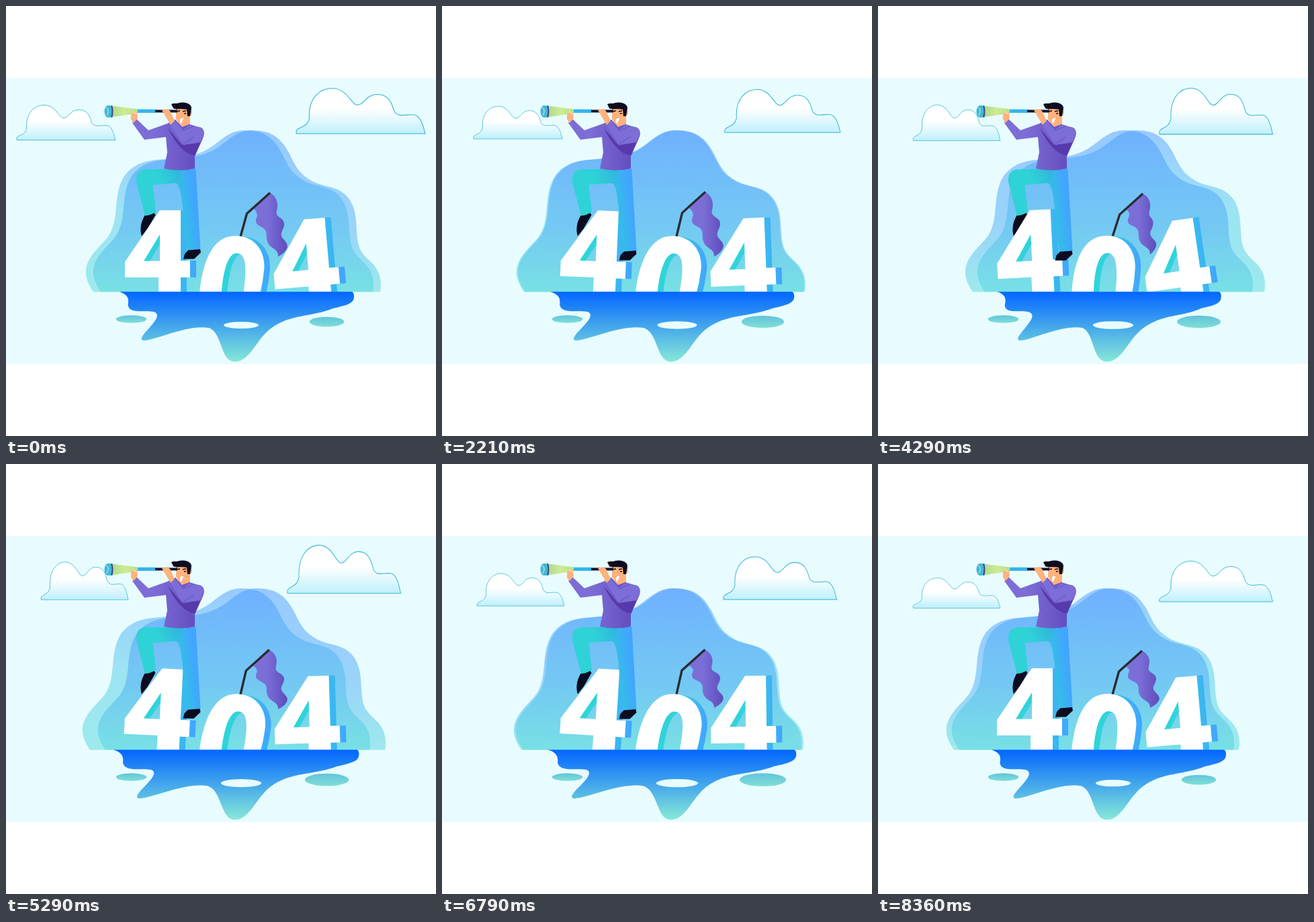
Recreate the animation shown at these times as an HTML page. Size 640x640 px, loop 8.43 s.

```html
<!DOCTYPE html>
<html lang="en">
<head>
<meta charset="utf-8">
<title>404</title>
<style>
  html, body { margin: 0; width: 100%; height: 100%; overflow: hidden; background: #fff; }
  svg { display: block; width: 100vw; height: 100vh; }
  .cloud { fill: url(#cloudFill); stroke: #35b6d6; stroke-width: 1.1; vector-effect: non-scaling-stroke; }
  .skin { fill: #ffb27c; }
  .dark { fill: #0c0c20; }
</style>
</head>
<body>
<svg viewBox="0 0 640 640">
  <defs>
    <linearGradient id="cloudFill" x2="0" y2="1">
      <stop offset=".45" stop-color="#fff"/><stop offset="1" stop-color="#bff0fc"/>
    </linearGradient>
    <linearGradient id="blueHill" x2="0" y2="1">
      <stop stop-color="#4797ff"/><stop offset=".6" stop-color="#4bacf3"/><stop offset="1" stop-color="#52d7db"/>
    </linearGradient>
    <linearGradient id="cyanHill" x2="0" y2="1">
      <stop stop-color="#4797ff"/><stop offset=".5" stop-color="#51cbe8"/><stop offset="1" stop-color="#52d7db"/>
    </linearGradient>
    <linearGradient id="waterFill" gradientUnits="userSpaceOnUse" x1="0" y1="427" x2="0" y2="530">
      <stop stop-color="#0468ff"/><stop offset="1" stop-color="#88e9d7"/>
    </linearGradient>
    <linearGradient id="poolFill" x2="0" y2="1">
      <stop stop-color="#62c3dc"/><stop offset="1" stop-color="#7fdfd6"/>
    </linearGradient>
    <linearGradient id="sideFill">
      <stop offset=".5" stop-color="#2fd4da"/><stop offset="1" stop-color="#42a4ff"/>
    </linearGradient>
    <linearGradient id="legFill" gradientUnits="userSpaceOnUse" x1="246" y1="270" x2="288" y2="264">
      <stop offset=".1" stop-color="#2fc6de"/><stop offset=".75" stop-color="#42a5ff"/>
    </linearGradient>
    <linearGradient id="thighFill" gradientUnits="userSpaceOnUse" x1="200" y1="270" x2="262" y2="245">
      <stop offset=".45" stop-color="#2fd2d6"/><stop offset="1" stop-color="#30b4de"/>
    </linearGradient>
    <linearGradient id="shirtFill">
      <stop offset=".3" stop-color="#7d6dd6"/><stop offset="1" stop-color="#5f47bb"/>
    </linearGradient>
    <linearGradient id="flagFill">
      <stop offset=".4" stop-color="#7b6fd7"/><stop offset="1" stop-color="#5e4cbc"/>
    </linearGradient>
    <linearGradient id="tubeFill">
      <stop stop-color="#a8dc8c"/><stop offset=".5" stop-color="#d0ea94"/><stop offset="1" stop-color="#b5e08e"/>
    </linearGradient>
    <clipPath id="shore"><path d="M0 0H640V425.500H0z"/></clipPath>
    <path id="cloud" d="M.5 68V64C3 57 17 60 20 45C18 14 36 0 54 0C77 0 82 24 91 25C101 26 105 9 121 9C141 9 143 25 147 35C154 46 171 36 180 41C188 47 190 57 193 68z"/>
    <path id="hill" d="M11 425.500C2 413 -1 402 0 393C2 370 26 355 35 340C47 320 43 295 49 272C55 248 72 232 105 229C135 226 160 226 183 212C200 202 212 185 236 185C265 185 280 196 293 222C302 241 309 254 333 264C350 270 366 270 378 284C392 300 391 322 392 335C393 352 395 362 403 371C410 379 420 385 425 398C428 406 429 416 427 425.500z"/>
    <path id="four" fill-rule="evenodd" d="M229 304H260V379H274V404H260V450H227V404H177V381zM229 340V379.500H205z"/>
    <path id="zero" fill-rule="evenodd" d="M287 450C288 390 304 342 341 342C374 342 387 370 384 393Q382 417 375 440zM320 450C320 410 327 368 343 368C360 368 359 395 350 450z"/>
    <g id="solidFour"><use href="#four" x="9" fill="url(#sideFill)"/><use href="#four" fill="#fff"/></g>
  </defs>

  <path fill="#e8fcff" d="M0 107H640V533H0z"/>
  <use href="#cloud" id="cloudL" class="cloud"/>
  <use href="#cloud" id="cloudR" class="cloud"/>
  <use href="#hill" id="hillA" fill="url(#cyanHill)" opacity=".5"/>
  <use href="#hill" id="hillB" fill="url(#blueHill)" opacity=".5"/>

  <g clip-path="url(#shore)">
    <path id="flag" fill="url(#flagFill)"/>
    <path id="pole" fill="none" stroke="#2a2b33" stroke-width="3.400"/>
    <path class="dark" d="M207 311L220 307L222.500 311L211 331L202 342.500C199 334 200 322 207 311z"/>
    <use href="#solidFour" id="digitL"/>
    <g id="digitM"><use href="#zero" x="8.500" y="1" fill="url(#sideFill)"/><use href="#zero" fill="#fff"/></g>
    <g id="digitR"><use href="#solidFour" x="223.500" y="11"/></g>
  </g>

  <path id="water" fill="url(#waterFill)"/>
  <ellipse cx="186.500" cy="466" rx="22.700" ry="5.800" fill="url(#poolFill)"/>
  <ellipse id="poolM" cx="350" cy="475" fill="#e9fdff"/>
  <ellipse id="poolR" cx="477.500" cy="470" fill="url(#poolFill)"/>

  <path id="legR" fill="url(#legFill)"/>
  <path fill="url(#thighFill)" d="M262 243H212C197 242 192 251 194.500 264L207 312Q214 312 223 306.500L218.500 266L256 263.500z"/>
  <path id="shoeR" class="dark" d="M271 363.500L289 362L290 367L280 376.500H264L266 369z"/>

  <path class="skin" d="M253 153H274C278 155 278 162 274 163V179L266 184L258 177L253 168z"/>
  <path fill="url(#shirtFill)" d="M194 168L212 185L240 175L252 169L262 180L273 176L286 180C296 181 296 190 293 197L281 224V242Q260 247 235 242L240 218L238 195L206 199L188 174z"/>
  <path fill="#5639aa" d="M241 182L262 207L289 202L281 222C268 222 252 205 241 182z"/>
  <path fill="#7d6dd6" d="M245 178L251 171L263 185L273 177L286 180C296 181 297 190 289 203L263 207z"/>
  <path fill="none" stroke="#6450bd" d="M263 186L279 179M262 207L279 195"/>
  <path class="dark" d="M246 146C250 144 253 146 258 144C268 142 276 146 276 152L274 164H270L269 154C260 152 252 155 249 152z"/>
  <path fill="none" stroke="#0c0c20" stroke-width="1.600" d="M254 157L259 156M263 157L268 156M265 160H268"/>
  <path fill="#fff" d="M259 169Q263 165 264 168L261 175Q258 174 259 169z"/>

  <path fill="#15142e" d="M222 154.500H255V158.500H222z"/>
  <path fill="#36b3ee" d="M196 153.800H222V159H196z"/>
  <path fill="url(#tubeFill)" d="M157 148.500L196 153.500V159.500L157 165.500z"/>
  <path fill="#3fc4d4" d="M152 148L159 148.500V165.500L152 166z"/>
  <path fill="none" stroke="#4b3c86" stroke-width="2" d="M157 148.500Q160 157 157 165.500"/>
  <ellipse cx="151.500" cy="157" rx="5" ry="9" fill="#45b3dc"/>
  <path fill="none" stroke="#7ce0cf" stroke-width="2" d="M149 151Q155 155 150 163"/>
  <path class="skin" d="M186 161L191 157L195 159L196 167L190 174L186 169z"/>
  <path fill="none" stroke="#fff" d="M189 157L194 161"/>
  <path class="skin" d="M232 155L240 153L244 156L251 171L245 177L239 167z"/>
</svg>
<script>
const LOOP = 8430;
const $ = id => document.getElementById(id);
const set = (id, name, value) => $(id).setAttribute(name, value);

const linear = u => u;
const smooth = u => (1 - Math.cos(Math.PI * u)) / 2;

function key(t, times, values, ease = linear) {
  let i = 0;
  while (i < times.length - 2 && t > times[i + 1]) i++;
  const u = Math.max(0, Math.min(1, (t - times[i]) / (times[i + 1] - times[i])));
  return values[i] + (values[i + 1] - values[i]) * ease(u);
}

// Turning points shared by the rocking digits and the sliding hills
const TURNS = [0, 1210, 3210, 4290, 5290, 6790, 7900];
const SWAY = [0, 1, .57, -.9, .93, 1.17, 0];
const CYAN_X = [119, 89, 133, 148, 114, 110, 110];
const BLUE_X = [130, 122, 104, 130, 137, 107, 102];

// Clouds shrink while drifting in, puff up, then sink.
function drawClouds(t) {
  const drift = key(t, [0, 2600], [0, 1]);
  const float = (...v) => key(t, [0, 2600, 5570, 7250], v);
  const top = float(0, 2, -2, 22), bottom = float(0, -2, 3, 15);
  const place = (id, x, dx, y, width, shrink, height) => set(id, 'transform',
    `translate(${x + dx * drift} ${y + top})
     scale(${(width - shrink * drift) / 193} ${(height + bottom - top) / 68})`);
  place('cloudL', 15.5, 36.5, 147.5, 147.5, 17.5, 52);
  place('cloudR', 431.5, -13, 122.5, 192.5, 23.5, 67.5);
}

function drawFlag(t, sway) {
  const px = 393 - 1.3 * sway, py = 278 - 1.5 * sway;
  const r = 5 * Math.min(0, sway);
  const len = key(t, [3210, 6200], [373, 363], smooth) - py;
  const y = f => py + len * f;
  set('pole', 'd', `M348.500 345L${px - 34.5} ${py + 31}L${px} ${py}`);
  set('flag', 'd', `M${px} ${py}C${px + 10} ${y(.06)} ${px + 13} ${y(.17)} ${px + 10} ${y(.28)}
    C${px + 7} ${y(.4)} ${415 + r} ${y(.38)} ${414 + r} ${y(.5)}
    C${413 + r} ${y(.59)} ${407 + r} ${y(.63)} ${411 + r} ${y(.7)}
    C${415 + r} ${y(.76)} ${420 + r} ${y(.79)} ${418.5 + r} ${y(.86)}Q${416 + r} ${y(.94)} 405 ${y(1)}
    C406 ${y(.87)} 392 ${y(.88)} 389 ${y(.76)}C386 ${y(.67)} 391 ${y(.6)} 381 ${y(.54)}
    C373 ${y(.5)} 370 ${y(.47)} 373 ${y(.39)}Q376 ${y(.32)} ${px - 24} ${py + 24}z`);
}

function drawWater(sway) {
  const w = .1 + .8 * sway, swell = Math.abs(sway);
  const x = (base, shift) => base + w * shift;
  set('water', 'd', `M${x(170, -12)} 425.300C${x(184, -11)} 430 ${x(184, -11)} 437 ${x(182.5, -10)} 445
    C${x(184, -8)} 459 ${x(207, -6)} 452 ${x(220, -5)} 455C${x(233, -7)} 459 ${x(221, -7)} 471 ${x(208, -9)} 486
    C${x(198, -9)} 498 ${x(203, -9)} 499 ${x(213, -9)} 497C${x(236, -7)} 492 ${x(275, -5)} 474 ${x(302, -3)} 479
    C323 486 318 529.500 341 529.500C363 529 372 497 394 480C423 458 ${x(456, 4)} 463 ${x(486, 8)} 450
    C${x(507, 8)} 445 ${x(517, 10)} 443 ${x(517, 10)} 432Q${x(517, 10)} 427 ${x(514, 10)} 425.300z`);

  const pool = (id, rx, flat) => { set(id, 'rx', rx); set(id, 'ry', rx * flat); };
  pool('poolM', 26 + 4.5 * swell, .195);
  pool('poolR', 25.8 + 7.5 * swell, .285);
}

function draw(t) {
  const sway = key(t, TURNS, SWAY, smooth);
  const turn = (id, angle, x, y) => set(id, 'transform', `rotate(${angle} ${x} ${y})`);

  drawClouds(t);
  set('hillA', 'x', key(t, TURNS, CYAN_X, smooth));
  set('hillB', 'x', key(t, TURNS, BLUE_X, smooth));
  drawFlag(t, sway);
  turn('digitL', 3 * sway, 225, 375);
  turn('digitM', 2.7 * sway, 337, 425);
  turn('digitR', 3.6 * sway - 5, 478, 419);
  drawWater(sway);

  // The standing foot rides on the first digit.
  const drop = 2.5 * Math.abs(sway);
  set('shoeR', 'transform', `translate(${-drop * .2} ${drop})`);
  set('legR', 'd', `M235 242Q260 247 282.500 242L289.500 ${363 + drop}L270 ${364.5 + drop}C262 305 263 272 254 264z`);
}

function frame() {
  draw(performance.now() % LOOP);
  requestAnimationFrame(frame);
}
frame();
</script>
</body>
</html>
```
